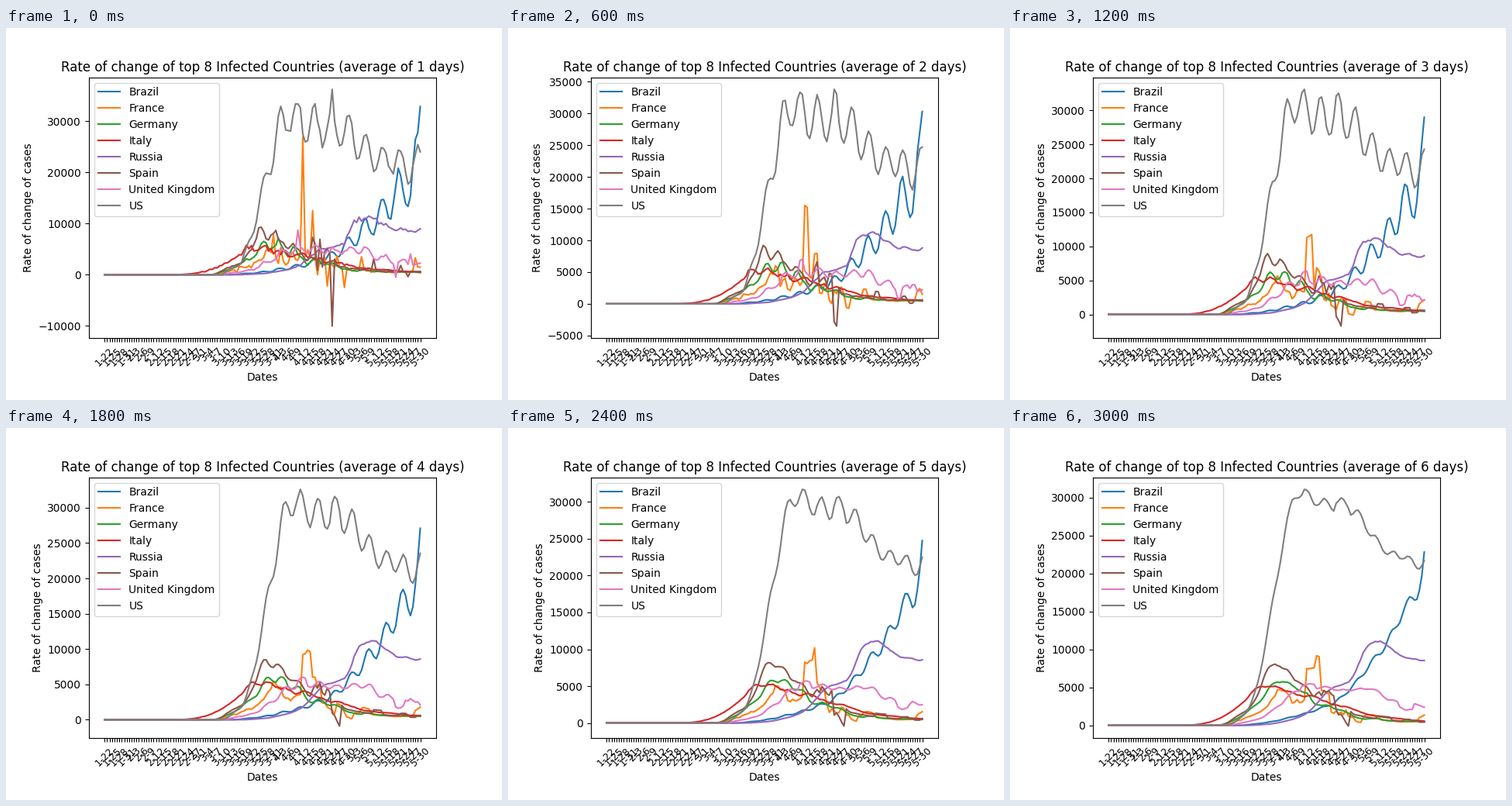
A matplotlib script that plays this animation: 640x480 px, repeating every 3600 ms.

```python
import numpy as np
import matplotlib.pyplot as plt
from matplotlib.animation import FuncAnimation

DAYS = 130
rng = np.random.default_rng(4)


def daily(trend, week=0, peak=0, noise=0.05, events=None):
    """Daily cases from a trend {day: thousands}, a weekly rhythm of strength
    `week` cresting on day `peak`, relative noise and one-off daily counts."""
    day = np.arange(DAYS)
    cases = np.interp(day, list(trend), list(trend.values()))
    cases *= 1 + week * np.cos(2 * np.pi * (day - peak) / 7)
    cases *= 1 + noise * rng.normal(size=DAYS)
    for when, count in (events or {}).items():
        cases[when] = count
    return cases * 1000


COUNTRIES = {
    "Brazil": daily(
        {52: 0, 63: 0.4, 70: 0.9, 77: 1.5, 84: 2.2, 91: 3.2, 98: 5.3,
         105: 8.3, 112: 11, 119: 16, 125: 17, 128: 22.6, 129: 33.3},
        week=0.25, peak=1.2, noise=0.02),
    "France": daily(
        {45: 0, 52: 0.8, 60: 1.8, 65: 3.9, 78: 4.1, 84: 3.8, 91: 2.2,
         100: 1, 106: 0.9, 115: 0.45, 124: 0.4, 129: 1.3},
        noise=0.2,
        events={69: 7.7, 71: 2.2, 74: 1.9, 81: 26.85, 85: 12.5, 87: 0,
                91: -2.2, 95: 3.7, 98: -2.5, 105: 3.5, 127: 3.3}),
    "Germany": daily(
        {44: 0, 52: 1.2, 58: 3, 61: 3.2, 65: 6.7, 68: 4.7, 71: 6.7,
         75: 3.6, 77: 5.4, 83: 1.8, 86: 3.3, 89: 1.9, 93: 2.2, 97: 1.2,
         103: 0.7, 106: 1.1, 110: 0.65, 129: 0.5}),
    "Italy": daily(
        {30: 0, 36: 0.2, 42: 0.7, 48: 1.9, 56: 4.3, 59: 6.3, 61: 5,
         65: 6, 69: 4.4, 73: 4.4, 76: 3.4, 80: 4.3, 84: 3.1, 95: 2.4,
         105: 1.3, 115: 0.9, 129: 0.45},
        noise=0.08),
    "Russia": daily(
        {56: 0, 66: 0.25, 75: 1, 80: 1.8, 88: 5, 92: 5.2, 98: 6.2,
         102: 10.4, 110: 11.3, 114: 9.8, 119: 8.8, 122: 9.1, 126: 8.4,
         129: 8.95},
        noise=0.025),
    "Spain": daily(
        {45: 0, 51: 1.6, 56: 2.2, 61: 5.6, 63: 9.2, 67: 7, 70: 8.2,
         75: 5.1, 77: 6, 83: 2.6, 86: 5.9, 92: 4.4, 94: 2.9, 95: 1.75,
         104: 1, 115: 0.6, 129: 0.6},
        events={85: 7.3, 87: 0.9, 88: 6.9, 89: 1.5, 93: -10.03, 110: 3.1,
                121: 1.8, 124: -0.4}),
    "United Kingdom": daily(
        {47: 0, 60: 0.9, 64: 1.8, 68: 2.7, 72: 4.3, 78: 4.8, 85: 5.1,
         94: 4.7, 106: 5, 110: 3.7, 115: 3.4, 119: 2.3, 123: 2.5, 129: 1.9},
        week=0.15, peak=2.5,
        events={79: 8.7, 119: -0.5, 125: 4.05}),
    "US": daily(
        {48: 0, 56: 2.4, 60: 7.5, 64: 15.4, 68: 22.5, 71: 28, 75: 31.2,
         84: 29.3, 93: 29.1, 100: 27.4, 110: 23, 120: 22.3, 124: 20.7,
         129: 22.7},
        week=0.13, peak=1.8, noise=0.015, events={93: 36.2}),
}


def day_label(i):
    if i % 3:
        return ""
    date = (np.datetime64("2020-01-22") + i).item()
    return f"{date.month}-{date.day}"


LABELS = [day_label(i) for i in range(DAYS)]


def trailing_mean(values, n):
    return np.convolve(values, np.ones(n) / n)[:DAYS]


fig = plt.figure(figsize=(6.4, 4.8), dpi=100)
ax = fig.add_axes([0.167, 0.167, 0.7, 0.7])


def draw(frame):
    n = frame + 1
    ax.clear()
    for name, cases in COUNTRIES.items():
        ax.plot(trailing_mean(cases, n), label=name)
    ax.set_xticks(range(DAYS), LABELS, rotation=45, fontsize=9)
    ax.set_title("Rate of change of top 8 Infected Countries "
                 f"(average of {n} days)")
    ax.set_xlabel("Dates")
    ax.set_ylabel("Rate of change of cases")
    ax.legend(loc="upper left")


anim = FuncAnimation(fig, draw, frames=6, init_func=lambda: None,
                     interval=600, repeat=True, repeat_delay=0)
plt.show()
```
